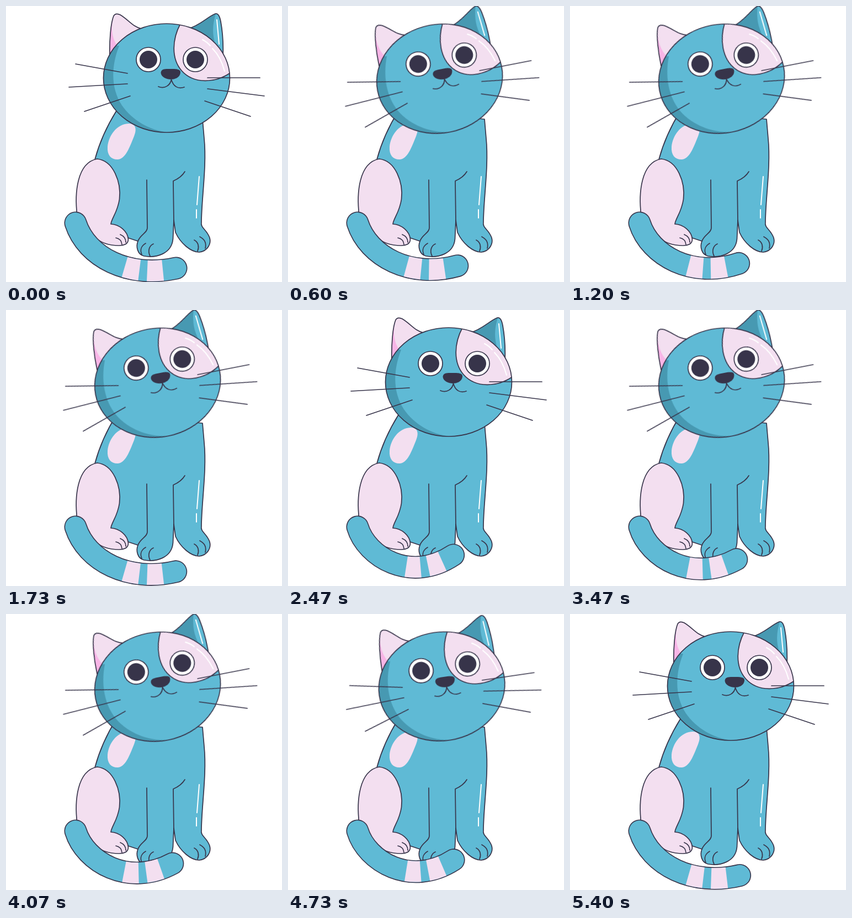
These frames come from a looping animation (500x500 px, 5.43 s). An HTML page:

```html
<!DOCTYPE html>
<html lang="en">
<head>
<meta charset="utf-8">
<title>Cat</title>
<style>
  :root { --blue: #5fbad5; --shade: #4799b2; --pink: #f3dff0; --ink: #37344a; }
  html, body { margin: 0; width: 100%; height: 100%; overflow: hidden; background: #fff; }
  svg { display: block; width: 100vw; height: 100vh; }

  path, ellipse, circle { stroke-linecap: round; stroke-linejoin: round; }
  .blue { fill: var(--blue); }
  .pink { fill: var(--pink); }
  .shade { fill: var(--shade); }
  .ink { fill: var(--ink); }
  .white { fill: #fff; }
  .line { stroke: var(--ink); stroke-width: 1.7; }
  .open { fill: none; }
  .shine { fill: none; stroke: #fff; stroke-width: 2; }

  .head { transform-origin: 289px 216px; animation: tilt 5430ms cubic-bezier(.37,0,.63,1) infinite; }
  @keyframes tilt {
    0%, 43.65%, 52.85%, 94.48%, 100% { transform: rotate(0deg); }
    11.05%, 33.15%, 63.17%, 83.48% { transform: rotate(-11deg); }
  }

  .lid { rx: 22px; ry: 22px; animation: blink 5430ms cubic-bezier(.37,0,.63,1) infinite; }
  @keyframes blink {
    0%, 23.76%, 28.91%, 54.97%, 60.13%, 66.3%, 71.45%, 100% { ry: 22px; }
    26.34%, 57.55%, 68.88% { ry: 1px; }
  }

  .tail path {
    fill: none;
    d: path("M126 393C146 455 222 494 308 475");
    animation: wag 1086ms cubic-bezier(.37,0,.63,1) infinite;
  }
  @keyframes wag {
    0%, 63.5%, 100% { d: path("M126 393C146 455 222 494 308 475"); }
    30%, 81% { d: path("M126 393C142 447 222 496 299.5 443.5"); }
  }
  .edge { stroke: var(--ink); stroke-width: 41; }
  .fur { stroke: var(--blue); stroke-width: 37.8; }
  .tail .bands {
    stroke: var(--pink); stroke-width: 37.8; stroke-linecap: butt;
    stroke-dasharray: 0 57 12.5 6.5 13 100;
  }
</style>
</head>
<body>
<svg viewBox="0 0 500 500">
  <defs>
    <clipPath id="face"><ellipse cx="291" cy="130.5" rx="114.5" ry="98.5"/></clipPath>
    <clipPath id="lid"><ellipse class="lid"/></clipPath>
    <g id="eye">
      <g clip-path="url(#lid)">
        <circle class="white" r="23"/>
        <circle class="ink" r="16"/>
      </g>
      <ellipse class="lid line open"/>
    </g>
  </defs>

  <g class="body">
    <path class="blue line" d="M200 190C180 222 168 252 161 278L150 330L190 395L221 420L239 426C235 436 238 450 250 453C272 457 300 449 302.500 422L304 388L307 410C316 430 335 446 350 446C366 444 372 430 369 420C364 405 352 402 354 392C354 350 364 290 359 240L356 205Z"/>
    <path class="pink" d="M184 255C186 235 200 214 222 213C236 213 237 224 232 236C224 256 216 278 202 278C190 278 183 270 184 255Z"/>
    <path class="pink line" d="M129 380C124 340 128 284 165 277C195 280 209 320 205.500 350C202 374 191 385 190 395C206 396 220 408 221.500 422C222 432 212 434 205 434C190 434 172 430 160 418Z"/>
    <path class="line open" d="M199 420Q209 422 210 432M207 414Q217 418 217 428"/>
    <path class="line open" d="M255 315L256 402C256 411 243 414 239 426M324 300C318 310 310 314 303 317L304 392"/>
    <path class="line open" d="M246 450C242 441 246 434 253 430M261 453C256 443 260 434 267 431M341 424C349 428 350 437 347 444M351 418C361 423 363 431 361 439"/>
    <path class="shine" d="M350 309L346 360M345 369V384"/>
  </g>

  <g class="head">
    <path class="pink" d="M188 95C187 60 190 30 195 18C198 13 203 14 207 16C222 25 230 38 245 41L240 95Z"/>
    <path fill="#f8b5e6" d="M188 95C187 65 189 42 193 24C190 48 194 62 204 76Z"/>
    <path class="line open" d="M188 95C187 60 190 30 195 18C198 13 203 14 207 16C222 25 230 38 245 41"/>
    <path class="blue" d="M330 41C350 36 365 20 378 14.500C384 12 387 18 389 28C393 50 394 70 393 93L350 95Z"/>
    <path class="shade" d="M330 41C350 36 365 20 380 14C374 35 373 50 380 72Z"/>
    <path class="line open" d="M330 41C350 36 365 20 378 14.500C384 12 387 18 389 28C393 50 394 70 393 93"/>
    <path class="shine" d="M382 25L386 69"/>

    <g clip-path="url(#face)">
      <path class="blue" d="M170 25H412V235H170Z"/>
      <path class="shade" d="M205 72C190 110 190 150 210 180C228 206 260 226 295 229L170 240L160 70Z"/>
      <path class="pink line" d="M316 32C301 60 299 95 318 117C340 142 380 140 408 120L420 20Z"/>
    </g>
    <ellipse class="line open" cx="291" cy="130.5" rx="114.5" ry="98.5"/>
    <path class="shine" d="M356 61Q364 65 370 72M374 77Q389 92 396 118"/>

    <use href="#eye" x="258" y="97"/>
    <use href="#eye" x="343" y="97"/>
    <path class="ink" d="M280.500 121C281 113 290 114 298 114C308 114 317 114 316 121C315 130 305 133 299 133C291 133 281 129 280.500 121Z"/>
    <path class="line open" d="M299.500 133C298 143 288 151 276 146M299.500 133C303 146 312 151 323 147"/>
    <path class="line open" d="M126 105L220 122M114 147L220 141M142 191L225 163M365 130H460M365 150L468 163M360 172L443 200"/>
  </g>

  <g class="tail">
    <path class="edge"/>
    <path class="fur"/>
    <path class="bands" pathLength="100"/>
  </g>
</svg>
</body>
</html>
```
